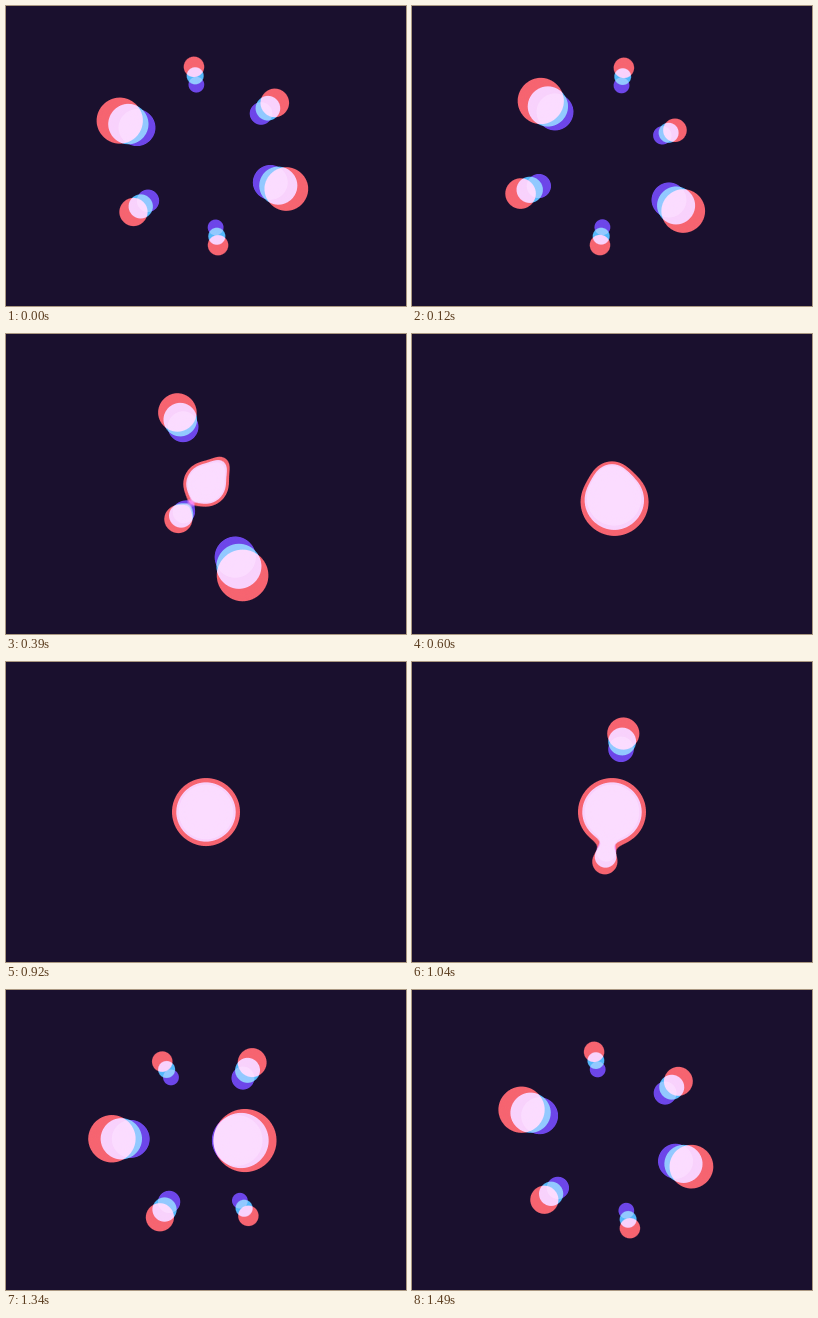
Write an HTML page that moves like this. It is 400 px wide and 300 px high and loops after 1.52 s.

```html
<!DOCTYPE html>
<html lang="en">
<head>
<meta charset="utf-8">
<title>Gooey orbit</title>
<style>
  html, body { margin: 0; height: 100%; overflow: hidden; background: #1a102e; }
  svg { display: block; width: 100vw; height: 100vh; background: #1a102e; isolation: isolate; }
  .layer { mix-blend-mode: screen; }
</style>
</head>
<body>
<svg id="stage" viewBox="0 0 400 300">
  <filter id="goo" filterUnits="userSpaceOnUse" x="-250" y="-200" width="500" height="400"
          color-interpolation-filters="sRGB">
    <feGaussianBlur stdDeviation="7"/>
    <feColorMatrix values="1 0 0 0 0  0 1 0 0 0  0 0 1 0 0  0 0 0 18 -6.7" result="shape"/>
    <feFlood id="tint"/>
  </filter>
  <rect width="400" height="300" fill="#1a102e"/>
</svg>
<script>
  const LOOP = 1520, STEP = 30, SPAN = 1320, PHASE = 600, ORBIT = 90;
  const SVG = 'http://www.w3.org/2000/svg';
  const stage = document.getElementById('stage');
  document.getElementById('tint').remove();

  // Radii: leaving the centre, resting on the orbit, back in the centre.
  const balls = [
    { angle: 300, leave: -5,  arrive: 870,  radii: [17, 14.3, 11], backOut: true },
    { angle: 120, leave: 34,  arrive: 990,  radii: [12, 14, 22], backIn: true },
    { angle: 240, leave: 112, arrive: 1030, radii: [23, 10.8, 9] },
    { angle: 60,  leave: 178, arrive: 1072, radii: [9, 10.8, 14] },
    { angle: 180, leave: 235, arrive: 1180, radii: [25, 22.4, 14], backOut: true },
    { angle: 0,   leave: 358, arrive: 1220, radii: [33, 21.2, 33], backIn: true }
  ];
  const layers = [
    { color: '#5c3ae4', scale: 0.8, shrink: 1 },
    { color: '#41b4fa', scale: 0.9, shrink: 0.97 },
    { color: '#f55a51', scale: 1, shrink: 1 }
  ];

  const clamp = x => Math.min(1, Math.max(0, x));
  const smooth = x => (x = clamp(x), x * x * (3 - 2 * x));
  const mix = (a, b, k) => a + (b - a) * k;
  const cubicIn = p => p ** 3;
  const backIn = p => 2.7 * p ** 3 - 1.7 * p ** 2;

  function add(parent, name, attributes) {
    const node = document.createElementNS(SVG, name);
    for (const key in attributes) node.setAttribute(key, attributes[key]);
    return parent.appendChild(node);
  }

  for (const layer of layers) {
    const group = add(stage, 'g', {
      class: 'layer', fill: layer.color, filter: 'url(#goo)',
      transform: `translate(200 150) scale(${layer.scale})`
    });
    layer.circles = balls.map(() => add(group, 'circle', {}));
  }

  function pose(ball, time) {
    const outTime = ball.backOut ? 440 : 360;
    const inTime = ball.backIn ? 440 : 400;
    const out = clamp((time - ball.leave) / outTime);
    const back = clamp(1 - (ball.arrive - time) / inTime);
    const distance = back > 0
      ? 1 - (ball.backIn ? backIn : cubicIn)(back)
      : 1 - (ball.backOut ? backIn : cubicIn)(1 - out);
    const [first, rest, last] = ball.radii;
    const radius = back > 0
      ? mix(rest, last, smooth((back - 0.25) / 0.6))
      : mix(first, rest, smooth(out / 0.6));
    const turn = 30 + 54 * Math.sin(Math.PI * (Math.min(time, SPAN) / SPAN - 0.5));
    const angle = (ball.angle + turn) * Math.PI / 180;
    return {
      x: ORBIT * distance * Math.cos(angle),
      y: ORBIT * distance * Math.sin(angle),
      radius
    };
  }

  function draw(now) {
    const time = Math.floor((now + PHASE) % LOOP / STEP) * STEP;
    balls.forEach((ball, i) => {
      const { x, y, radius } = pose(ball, time);
      for (const { circles, shrink } of layers) {
        circles[i].setAttribute('cx', x);
        circles[i].setAttribute('cy', y);
        circles[i].setAttribute('r', radius * shrink);
      }
    });
  }

  const start = performance.now();
  function tick() {
    draw(performance.now() - start);
    requestAnimationFrame(tick);
  }
  tick();
</script>
</body>
</html>
```
